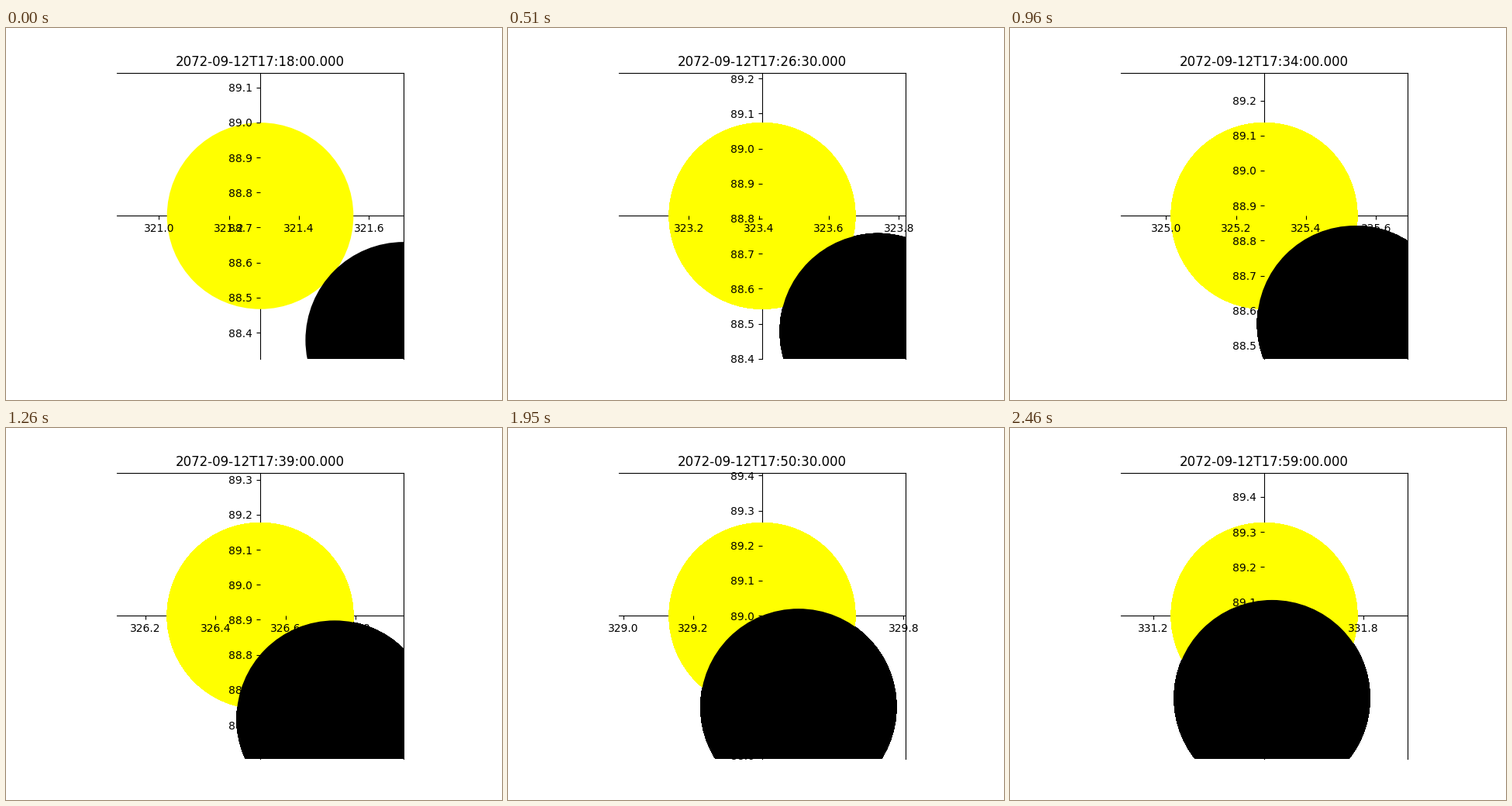
Recreate the animation shown at these times as a matplotlib script. Size 640x480 px, loop 2.49 s.

```python
import matplotlib.pyplot as plt
from matplotlib.animation import FuncAnimation
from matplotlib.patches import Circle
from matplotlib.ticker import MultipleLocator

FRAMES, STEP_MS = 83, 30
SCALE = 452.0                  # pixels per degree
HALF_VIEW = 184.8 / SCALE
SUN_R = 120.3 / SCALE
MOON_R = 126.6 / SCALE


class Disc(Circle):
    """A circle painted several times over, which hardens its edge."""
    copies = 1

    def draw(self, renderer):
        for _ in range(self.copies):
            super().draw(renderer)


def add_disc(radius, color, zorder):
    return ax.add_patch(Disc((0, 0), radius, facecolor=color, lw=0, zorder=zorder))


def sun_position(k):
    return 321.2893 + 0.124726 * k, 88.7333 + 0.00449 * k - 6.1e-6 * k * k


def moon_offset(k):
    dx = 185 - 2.1 * k - 0.0004 * k * k
    dy = -160.3 + 0.661 * k
    return dx / SCALE, dy / SCALE


def timestamp(k):
    minutes, half = divmod(k, 2)
    return f"2072-09-12T17:{18 + minutes:02d}:{30 * half:02d}.000"


plt.rcParams["font.family"] = "DejaVu Sans"
fig, ax = plt.subplots(figsize=(6.4, 4.8), dpi=100)
ax.set_aspect("equal")
for side in ("left", "bottom"):
    ax.spines[side].set_position("center")
for spine in ax.spines.values():
    spine.set_zorder(1)
for axis, step in ((ax.xaxis, 0.2), (ax.yaxis, 0.1)):
    axis.set_major_locator(MultipleLocator(step))
    axis.set_major_formatter("{x:.1f}")
    axis.set_zorder(4)

# The moon's rim is hard against the sky but soft against the sun.
moon_back = add_disc(MOON_R, "black", 2)
sun = add_disc(SUN_R, "yellow", 3)
moon = add_disc(MOON_R, "black", 5)


def update(k):
    x, y = sun_position(k)
    dx, dy = moon_offset(k)
    sun.center = x, y
    moon.center = moon_back.center = x + dx, y + dy
    sun.copies = min(k + 1, 30)
    moon_back.copies = min(k, 30)
    ax.set_xlim(x - HALF_VIEW, x + HALF_VIEW)
    ax.set_ylim(y - HALF_VIEW, y + HALF_VIEW)
    ax.set_title(timestamp(k))
    return sun, moon_back, moon


anim = FuncAnimation(fig, update, frames=FRAMES, interval=STEP_MS,
                     repeat=True, repeat_delay=0, blit=False)
plt.show()
```
